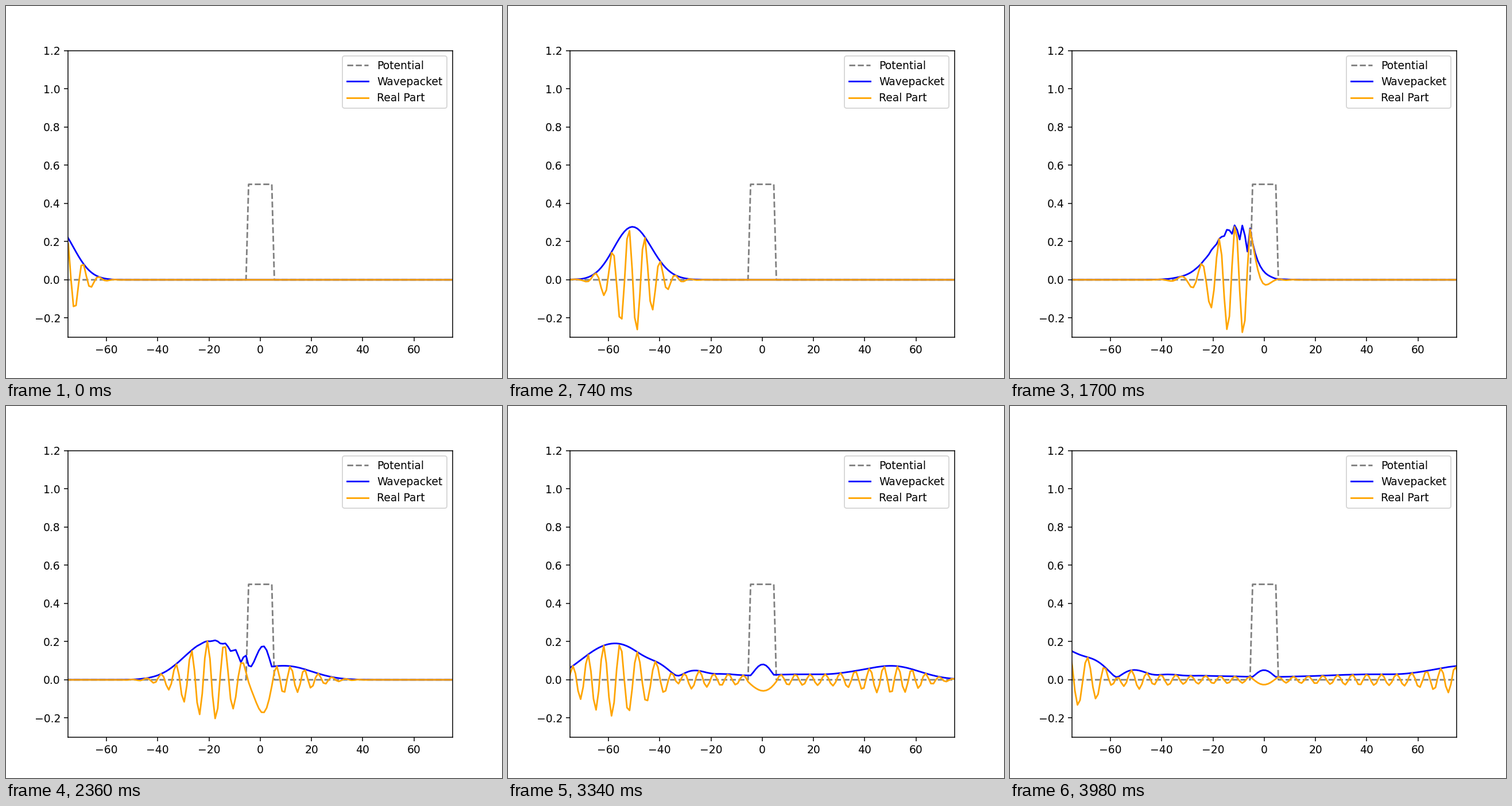
A matplotlib script for the animation above (4000 ms loop, 864 by 648 pixels).

```python
import matplotlib.pyplot as plt
import numpy as np
from matplotlib.animation import FuncAnimation

FRAMES = 200
LENGTH, N = 200.0, 200
DT, DX = 1.0, LENGTH / N
SIGMA, K0, X0 = 5.0, 1.0, -80.0
BARRIER_HEIGHT, BARRIER_WIDTH = 0.5, 10.0

x = np.linspace(-LENGTH / 2, LENGTH / 2, N)
potential = np.where(np.abs(x) < BARRIER_WIDTH / 2, BARRIER_HEIGHT, 0.0)


def initial_packet():
    norm = (2 * np.pi * SIGMA**2) ** -0.25
    return norm * np.exp(-((x - X0) ** 2) / (4 * SIGMA**2) + 1j * K0 * x)


def evolution_matrix():
    """One Crank-Nicolson step of the Schroedinger equation."""
    hop = np.full(N - 1, -0.5 / DX**2)
    h = np.diag(1 / DX**2 + potential) + np.diag(hop, 1) + np.diag(hop, -1)
    eye = np.eye(N)
    return np.linalg.solve(eye + 0.5j * DT * h, eye - 0.5j * DT * h)


def simulate():
    step = evolution_matrix()
    states = [initial_packet()]
    for _ in range(FRAMES - 1):
        states.append(step @ states[-1])
    return states


states = simulate()

fig, ax = plt.subplots(figsize=(6.4, 4.8), dpi=135)
ax.set_xlim(-75, 75)
ax.set_ylim(-0.3, 1.2)
ax.plot(x, potential, "--", color="gray", label="Potential")
modulus, = ax.plot(x, np.abs(states[0]), color="blue", label="Wavepacket")
real, = ax.plot(x, states[0].real, color="orange", label="Real Part")
ax.legend(loc="upper right")


def update(i):
    modulus.set_ydata(np.abs(states[i]))
    real.set_ydata(states[i].real)
    return modulus, real


anim = FuncAnimation(fig, update, frames=FRAMES, interval=20,
                     repeat=True, repeat_delay=0)
plt.show()
```
